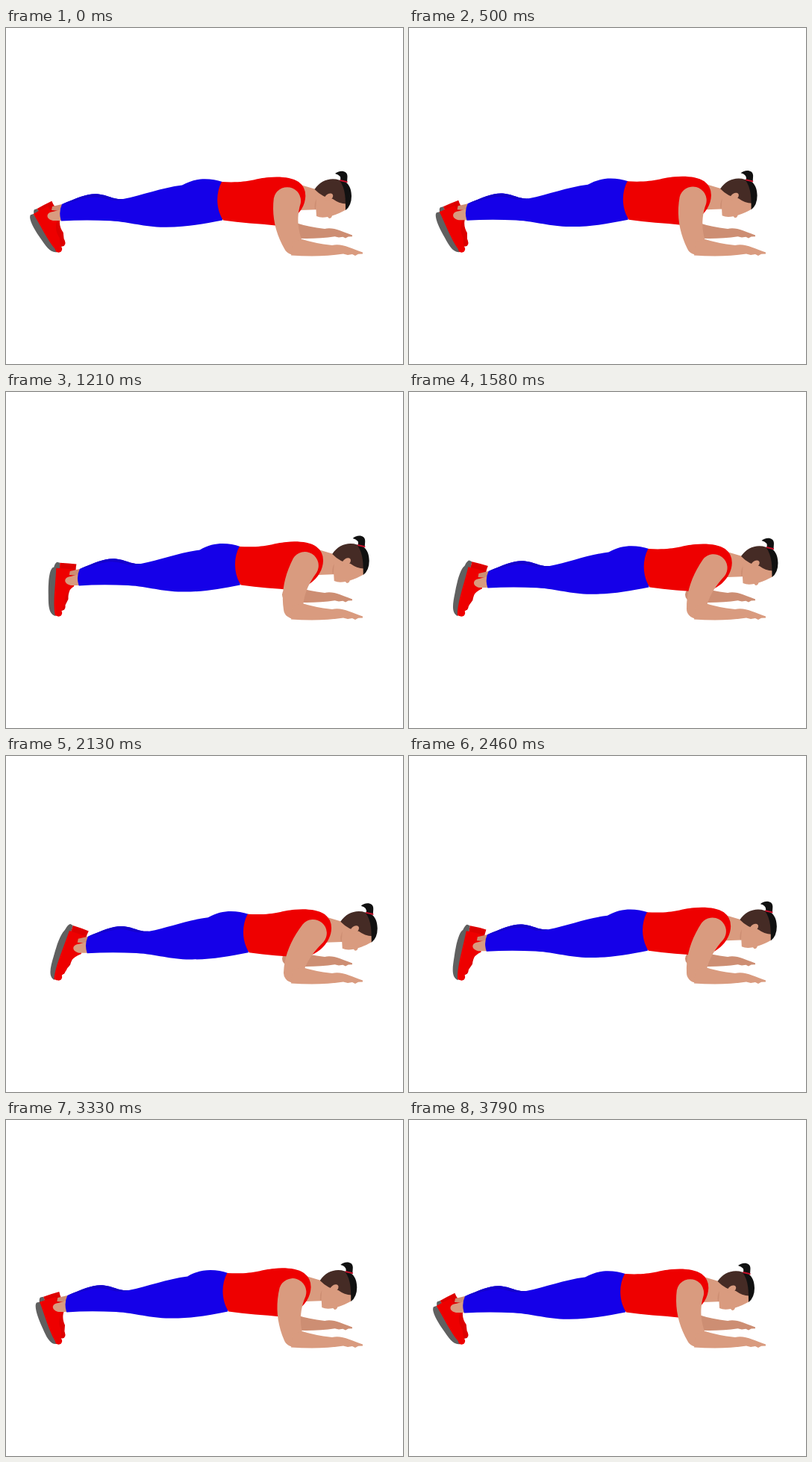
Animation, 532 px wide and 450 px high, one loop 3.83 s. Source, as an HTML page:

```html
<!DOCTYPE html>
<html lang="en">
<head>
<meta charset="utf-8">
<title>Plank rock</title>
<style>
html, body { margin: 0; width: 100%; height: 100%; overflow: hidden; background: #fff; }
svg { display: block; width: 100vw; height: 100vh; }
.skin { fill: #d99b7f; }
.shade { fill: #cd8e73; }
.red { fill: #ee0000; }
.black { fill: #111; }
</style>
</head>
<body>
<svg viewBox="0 0 532 450">
  <defs>
    <g id="shoe">
      <path fill="#606060" d="M50 241C45 244 48 262 52 276C55 288 58 300 68 300L66 290C61 275 58 258 54 241Z"/>
      <path fill="currentColor" d="M54 241Q65 239 76 238Q76 248 83 258C74 267 74 276 76 283L74 291C75 297 72 300 67 299C60 285 58 260 54 241Z"/>
    </g>
    <path id="forearm" d="M382 304.5L384 286L397 283Q412 288 437 291C450 288 462 295 478 300.5V302.5L472 302.8L468 305L464 303L458 304L452 302.5C430 306 405 306 382 304.5Z"/>
  </defs>

  <g class="shade">
    <circle cx="379" cy="271.5" r="9"/>
    <use href="#forearm" transform="translate(33.8 7) scale(.9)"/>
  </g>

  <g transform="translate(5 -7)" color="#dd0000">
    <use class="foot" href="#shoe"/>
    <circle cx="70" cy="295" r="4.5" fill="currentColor"/>
  </g>
  <g color="#ee0000">
    <use class="foot" href="#shoe"/>
    <circle cx="70.5" cy="296" r="4.7" fill="currentColor"/>
  </g>

  <g id="body">
    <path class="shade" d="M62 239L75 236V245L61 244Z"/>
    <path class="skin" d="M77 242V258H63C53 256 53 247 63 246Z"/>

    <path fill="#1500e8" d="M75 236C97 227 110 221 124 222.5C137 224 144 230 157 229C183 224 208 214 236 210.5C256 199 275 201.5 290 206V257.5C262 263 240 267 212 266.7C184 266.5 168 260 140 258.2Q105 256.5 74 258.5Q70 247 75 236Z"/>
    <path fill="#1400cc" d="M75 236C97 227 110 221 124 222.5C137 224 144 230 157 229C141 234 134 227 120 226.5C106 226 95 232 75 236Z"/>

    <path class="skin" d="M388 208L415 216L422 243L394 244Z"/>
    <path class="skin" d="M414 217Q432 198 456 212V243Q448 248 437 251.5Q436 255 433 255L431 253Q422 255 416 252Z"/>
    <path class="shade" d="M416 229Q412.5 236 414 243H415Z"/>
    <path fill="#452b25" d="M413.5 216C423 202 440 197.5 456 208V235.5Q446 235 438 229Q424 227 413.5 216Z"/>
    <ellipse class="skin" cx="432.5" cy="226.7" rx="6.5" ry="4.3" transform="rotate(-38 432.5 226.7)"/>
    <path class="black" d="M447 204C458 204 463 214 463 225Q463 238 455 244C455 230 455.5 216 447 204Z"/>
    <path class="black" d="M441 195C446 190 458 190 457.5 199L457 207L448 205Q450 197 441 195Z"/>
    <path fill="#c8102a" d="M447.5 203L457.5 205.3V207.3L447.5 205Z"/>

    <path class="red" d="M289 206C281 221 281 242 291 257.5C315 261 338 262 361 264.5C385 261 401 243 401.3 225Q401.5 213 392 206C383 200 367 198.5 352 200C333 201.5 325 208 289 206Z"/>
  </g>

  <g class="skin">
    <path id="arm"/>
    <use href="#forearm"/>
  </g>
</svg>
<script>
const LOOP = 3830, HOLD = 130, STEP = 3700 / 89, REACH = 35.4;
const body = document.getElementById('body');
const arm = document.getElementById('arm');
const feet = document.querySelectorAll('.foot');

// Tapered, curved limb with round ends; c is the control point of its axis
function limb(a, c, b, ra, rb) {
  const left = [], right = [], n = 10;
  for (let i = 0; i <= n; i++) {
    const u = i / n, v = 1 - u, r = ra * v + rb * u;
    const [x, y] = [0, 1].map(k => v * v * a[k] + 2 * u * v * c[k] + u * u * b[k]);
    const [tx, ty] = [0, 1].map(k => v * (c[k] - a[k]) + u * (b[k] - c[k]));
    const len = Math.hypot(tx, ty), nx = -ty / len * r, ny = tx / len * r;
    left.push([x + nx, y + ny]);
    right.unshift([x - nx, y - ny]);
  }
  return `M${left.join('L')}A${rb} ${rb} 0 0 0 ${right.join('L')}A${ra} ${ra} 0 0 0 ${left[0]}Z`;
}

function draw(time) {
  let t = time % LOOP;
  if (t >= HOLD) t = HOLD + Math.floor((t - HOLD) / STEP) * STEP;

  // Rock forward and back once, rising a little before dipping
  const u = Math.min(1, Math.max(0, (t - HOLD) / (LOOP - HOLD - STEP)));
  const dx = REACH * Math.abs(Math.sin(Math.PI * u)) ** 1.8;
  const dy = dx * (0.0115 * dx - 0.235);
  body.setAttribute('transform', `translate(${dx} ${dy})`);

  // Feet roll over the toes and lengthen as the heels come over
  const roll = 1.4 * (dx - 14.3), stretch = 1 + 0.00012 * dx * dx;
  for (const foot of feet) {
    foot.setAttribute('transform',
      `translate(68 294) rotate(${roll}) scale(1 ${stretch}) translate(-68 -294)`);
  }

  // Upper arm swings over the planted elbow
  const shoulder = [376.8 + dx, 231.5 + dy], elbow = [385, 290.5];
  const mid = [(shoulder[0] + elbow[0]) / 2 - 10, (shoulder[1] + elbow[1]) / 2];
  arm.setAttribute('d', limb(shoulder, mid, elbow, 18.3, 13));
}

const start = performance.now();
function tick() {
  draw(performance.now() - start);
  requestAnimationFrame(tick);
}
tick();
</script>
</body>
</html>
```
